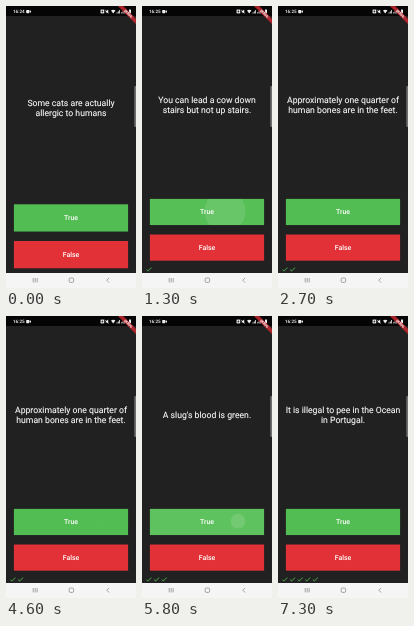
An HTML page for the animation above (8000 ms loop, 130 by 282 pixels).

```html
<!DOCTYPE html>
<html lang="en">
<head>
<meta charset="utf-8">
<title>True or false quiz</title>
<style>
html, body { margin: 0; width: 100%; height: 100%; overflow: hidden; background: #212121; }
svg { display: block; width: 100vw; height: 100vh; }
text { font-family: Roboto, sans-serif; fill: #fff; text-rendering: geometricPrecision; }
.mid { text-anchor: middle; }
.ask { font-size: 8.67px; stroke: #fff; stroke-width: .1px; }
.label { font-size: 6.94px; font-weight: 500; }
</style>
</head>
<body>
<svg viewBox="0 0 130 282" preserveAspectRatio="none">
  <defs>
    <clipPath id="clip"><rect id="clipBox" x="7.9" width="114.2"/></clipPath>
    <path id="check" fill="#4caf50" d="M9 16.17L4.83 12l-1.42 1.41L9 19 21 7l-1.41-1.41z"/>
  </defs>
  <rect width="130" height="282" fill="#212121"/>
  <rect width="130" height="10" fill="#050505"/>

  <text id="clock" x="7" y="7.2" font-size="4.6" font-weight="500"></text>
  <g fill="#eee">
    <rect x="20.2" y="4" width="3.2" height="3.2" rx=".6"/>
    <path d="M23.4 5.6l1.6-1.3v2.6z"/>
    <path d="M94.6 3.6h3.6v3.8h-3.6z"/>
    <path d="M99.8 4.8h1l1.4-1.2v4l-1.4-1.2h-1z"/>
    <path d="M105 4.6q2.2-1.6 4.4 0L107.2 7.5z"/>
    <path d="M110.6 7.5v-1.3h.8v1.3zM111.9 7.5v-2.3h.8v2.3zM113.2 7.5v-3.6h.8v3.6z"/>
    <path d="M115.3 7.5v-1.3h.8v1.3zM116.6 7.5v-2.3h.8v2.3zM117.9 7.5v-3.6h.8v3.6z"/>
    <rect x="123" y="3.4" width="2" height="4.2" rx=".4"/>
  </g>
  <path d="M98.9 3.9l3.8 3.4" stroke="#eee" stroke-width=".5"/>
  <circle cx="96.4" cy="5.5" r=".9" fill="#333"/>

  <g transform="translate(130 0) rotate(45)">
    <rect x="-12.6" y="9" width="25.2" height="3.8" fill="#c6282f" fill-opacity=".85"/>
    <text class="mid" y="12" font-size="3.2" font-weight="900">DEBUG</text>
  </g>

  <g id="ask"></g>
  <rect id="yes" x="7.9" width="114.2" fill="#52bd52"/>
  <g clip-path="url(#clip)" fill="#fff">
    <rect id="glow" x="7.9" width="114.2"/>
    <circle id="ripple"/>
  </g>
  <rect id="no" x="7.9" width="114.2" fill="#e33237"/>
  <text id="yesText" class="mid label" x="65">True</text>
  <text id="noText" class="mid label" x="65">False</text>
  <g id="checks"></g>

  <rect x="128.3" y="80" width="3" height="41" rx="1" fill="#707070"/>

  <rect y="267" width="130" height="15" fill="#f5f5f5"/>
  <g fill="none" stroke="#777" stroke-width=".65">
    <path d="M27.2 272v4.4M29.2 272v4.4M31.2 272v4.4"/>
    <rect x="63.2" y="272" width="4.4" height="4.4" rx="1.2"/>
    <path d="M103 271.9l-2.2 2.3 2.2 2.3"/>
  </g>
</svg>
<script>
const LOOP = 8000, STEP = 100, RELEASE = 300;
const QUESTIONS = [
  ['Some cats are actually', 'allergic to humans'],
  ['You can lead a cow down', 'stairs but not up stairs.'],
  ['Approximately one quarter of', 'human bones are in the feet.'],
  ["A slug's blood is green."],
  ["Rudd Elvark's mother's maiden", 'name was "Fern".'],
  ['It is illegal to pee in the Ocean', 'in Portugal.']
];
// Each tap: press time, x, and y within the button
const TAPS = [[1000, 83, 12.5], [2200, 90, 13], [4600, 95, 13.6], [5600, 96, 12.3], [6800, 97, 13]];
const LINE = 10.16, GAP = 4.73, TOP = 10, BOTTOM = 267, ROW = 7.58;

const $ = id => document.getElementById(id);
const set = (id, attrs) => {
  for (const k in attrs) $(id).setAttribute(k, attrs[k]);
};

// Column with flex 5 : 1 : 1 above the row of checks
function layout(count) {
  const end = BOTTOM - (count ? ROW : 0);
  const unit = (end - TOP) / 7;
  const h = unit - 2 * GAP;
  const yes = TOP + 5 * unit + GAP, no = yes + unit;
  for (const id of ['yes', 'glow', 'clipBox']) set(id, { y: yes, height: h });
  set('no', { y: no, height: h });
  set('yesText', { y: yes + h / 2 + 2.37 });
  set('noText', { y: no + h / 2 + 2.37 });

  const lines = QUESTIONS[count];
  const first = TOP + 2.5 * unit - lines.length * LINE / 2 + 8.04;
  $('ask').innerHTML = lines.map((s, i) =>
    `<text class="mid ask" x="65" y="${first + i * LINE}">${s}</text>`).join('');
  $('checks').innerHTML = Array.from({ length: count }, (_, i) =>
    `<use href="#check" transform="translate(${3.16 + i * ROW} ${BOTTOM - ROW}) scale(.316)"/>`).join('');
  return yes;
}

// Slow growth while held, then a fast spread that fades out
function splash(age) {
  const held = Math.min(age, 260), free = Math.max(0, age - 260);
  return {
    r: 0.6 + held * 0.034 + free * 0.28,
    alpha: 0.13 * Math.max(0, 1 - free / 200),
    glow: 0.07 * (free ? Math.max(0, 1 - free / 60) : Math.min(1, age / 200))
  };
}

let shown = -1, buttonY = 0;
function draw(ms) {
  const t = Math.floor(ms / STEP) * STEP;
  const count = TAPS.filter(([at]) => t >= at + RELEASE).length;
  if (count !== shown) {
    buttonY = layout(count);
    shown = count;
  }
  $('clock').textContent = t < 500 ? '16:24' : '16:25';

  const tap = TAPS.find(([at]) => t >= at && t < at + 500);
  const s = tap ? splash(t - tap[0]) : { r: 0, alpha: 0, glow: 0 };
  set('glow', { 'fill-opacity': s.glow });
  set('ripple', {
    cx: tap ? tap[1] : 0, cy: tap ? buttonY + tap[2] : 0,
    r: s.r, 'fill-opacity': s.alpha
  });
}

const start = performance.now();
function tick() {
  draw((performance.now() - start) % LOOP);
  requestAnimationFrame(tick);
}
tick();
</script>
</body>
</html>
```
